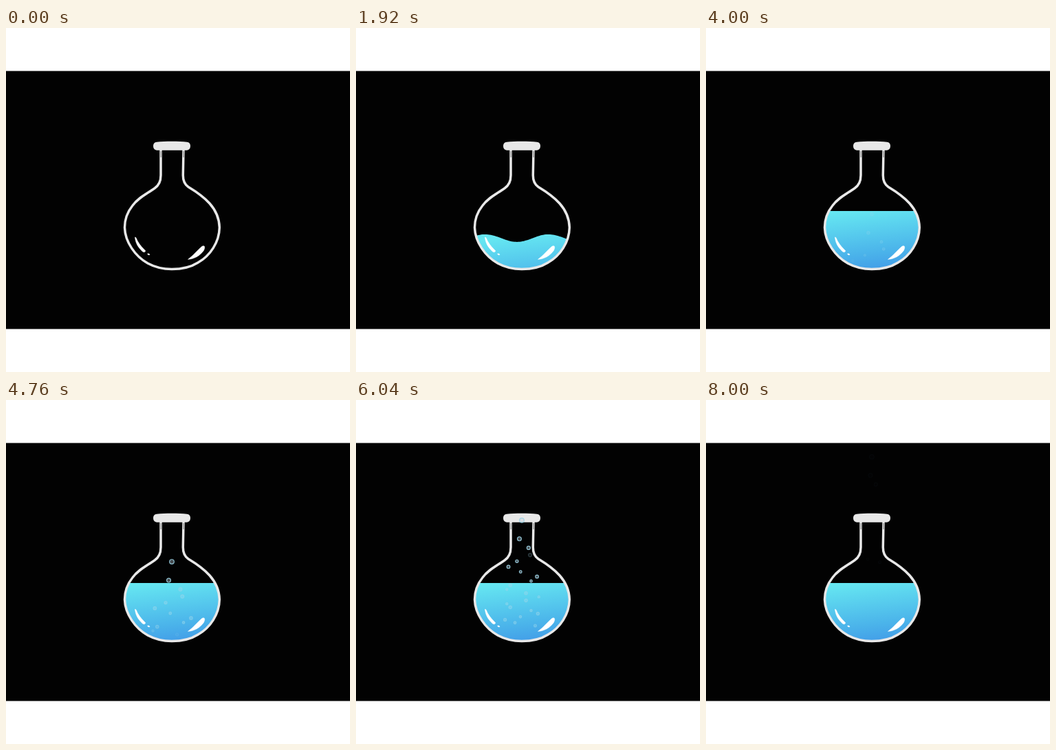
An HTML page with a canvas for the animation above (8.04 s loop, 500 px wide and 500 px high).

```html
<!DOCTYPE html>
<html lang="en">
<head>
<meta charset="utf-8">
<title>Bubbling flask</title>
<style>
html, body { margin: 0; width: 100%; height: 100%; overflow: hidden; background: #fff; }
canvas { display: block; width: 500px; height: 500px; }
</style>
</head>
<body>
<canvas width="500" height="500"></canvas>
<script>
const ctx = document.querySelector('canvas').getContext('2d');
const LOOP = 8040, FULL = 266, CENTRE = 241, BUBBLES = 22;

const flask = new Path2D(`M225 177 L225 214 C225 223 222 229 216 233 C203 242 192 247 184 258
  C176 268 172.5 278 172.5 290 C173 311 188 332 206 342 C217 348 229 350.5 241 350.5
  C255 350.5 268 348 279 341 C297 331 310 311 310.3 290 C310 276 304 264 296 255
  C287 245 275 237 265 231 C259 227 257.3 222 257.3 214 L258 177`);
const rim = new Path2D(`M219 165.8 C231 164.4 251 164.4 263 165.8 Q268 166.5 268 171.5
  Q268 177 263 177.8 L219 177.8 Q214 177 214 171.5 Q214 166.5 219 165.8Z`);
const shine = new Path2D(`M187.5 304 C189 303.5 190 307 191.5 310 C195 316 199 320 202.5 323.5
  C203 326 200 326.5 198 324.5 C192 319 188 312 187.5 304Z
  M264.5 336.3 C272 331 279 322 285 317.3 C289 315 290 319 287 324 C282 331 273 336 264.5 336.3Z
  M205.5 328.3 Q208 327 209 329.5 Q207 331 205.5 328.3Z`);

const clamp = v => Math.max(0, Math.min(1, v));
const wave = (distance, length) => Math.cos(2 * Math.PI * distance / length);

function drawLiquid(t) {
  if (t < 600) return;
  const level = Math.max(FULL, 349 - 0.033 * (t - 600));
  const height = 5.5 * clamp((t - 600) / 1000) * clamp((3280 - t) / 500);
  const crest = 239 + (t - 1240) * 0.06;
  const gradient = ctx.createLinearGradient(236, level - 3, 246, level + 84);
  gradient.addColorStop(0, '#65e6f1');
  gradient.addColorStop(0.75, '#4ab2ea');
  gradient.addColorStop(1, '#439fe8');
  ctx.save();
  ctx.clip(flask);
  ctx.beginPath();
  ctx.moveTo(170, 360);
  for (let x = 170; x <= 314; x += 2) ctx.lineTo(x, level - height * wave(x - crest, 92));
  ctx.lineTo(314, 360);
  ctx.fillStyle = gradient;
  ctx.fill();
  ctx.restore();
}

// Bubbles follow one another ever more densely, spread wider and drift inwards as they rise.
function drawBubble(i, t) {
  const rise = (t - 5400) / 1360;
  const spread = Math.min(28, 10 * Math.sqrt(i)) * wave(i - 2.5, 4.75);
  const x = CENTRE + spread * (1 - 0.25 * rise);
  const y = 205 + 27 * i ** 0.57 - 64 * rise;
  const growth = clamp((t - 3440) / 1200);
  const pop = i < 3 ? 1 : clamp((y - 222) / 12); // small ones burst above the surface
  const alpha = growth * pop * clamp((345 - y) / 20) * clamp((8050 - t) / 1300);
  if (!alpha) return;

  const inside = y > FULL;
  const radius = (1.9 + 1.4 * 0.7 ** i + 0.3 * Math.sin(3 * i)) * (0.5 + growth / 2);
  ctx.globalAlpha = alpha * (inside ? 0.55 : 0.9);
  ctx.beginPath();
  ctx.arc(x, y, radius, 0, 2 * Math.PI);
  ctx.fillStyle = inside ? 'rgba(150,225,250,.6)' : 'rgba(190,205,215,.4)';
  ctx.fill();
  ctx.strokeStyle = '#9bd3e6';
  ctx.lineWidth = 1.2;
  ctx.stroke();
  ctx.globalAlpha = 1;
}

function drawFlask() {
  ctx.strokeStyle = '#e8e8e8';
  ctx.lineWidth = 3.5;
  ctx.stroke(flask);
  ctx.fillStyle = '#777';
  for (const x of [224.7, 257.5]) ctx.fillRect(x, 179, 1, 9);
  ctx.fillStyle = '#e8e8e8';
  ctx.fill(rim);
}

function drawShine() {
  ctx.fillStyle = ctx.strokeStyle = '#fff';
  ctx.lineWidth = 0.5;
  ctx.fill(shine);
  ctx.stroke(shine);
}

function frame(now) {
  const t = now % LOOP;
  ctx.fillStyle = '#fff';
  ctx.fillRect(0, 0, 500, 500);
  ctx.fillStyle = '#020202';
  ctx.fillRect(0, 62.5, 500, 375);
  drawLiquid(t);
  drawFlask();
  for (let i = 0; i < BUBBLES; i++) drawBubble(i, t);
  drawShine();
  requestAnimationFrame(() => frame(performance.now()));
}
frame(0);
</script>
</body>
</html>
```
